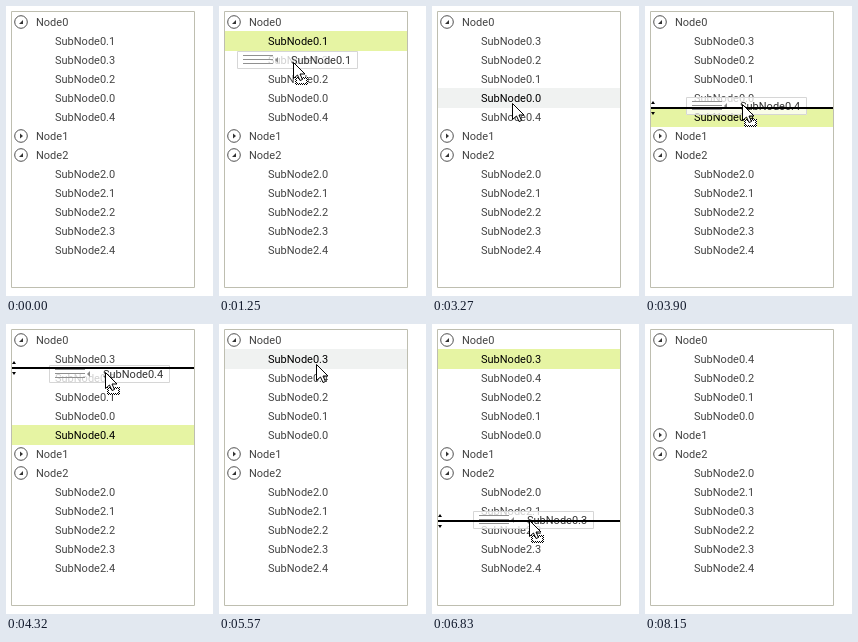
Recreate the animation shown at these times as an HTML page with a canvas. Size 207x290 px, loop 8430 ms.

```html
<!DOCTYPE html>
<html lang="en">
<head>
<meta charset="utf-8">
<title>Tree drag and drop</title>
<style>
  html, body { margin: 0; width: 100%; height: 100%; overflow: hidden; background: #fff; }
  canvas { display: block; }
</style>
</head>
<body>
<canvas id="stage" width="207" height="290"></canvas>
<script>
const ctx = document.getElementById('stage').getContext('2d', { alpha: false });
const LOOP = 8430, STEP = 140, SETTLE = 150;
const TOP = 6, ROW = 19, LEFT = 6, RIGHT = 188;

const children = (node, order) => order.map(n => `SubNode${node}.${n}`);
const START = ['Node0', ...children(0, [1, 3, 2, 0, 4]), 'Node1',
  'Node2', ...children(2, [0, 1, 2, 3, 4])];

const DRAGS = [
  { press: 970, lift: 1100, drop: 2680, from: 1, to: 3 },
  { press: 3650, lift: 3780, drop: 4920, from: 5, to: 2 },
  { press: 5720, lift: 5850, drop: 7290, from: 1, to: 9 },
];

// The pointer glides to each point in even steps, resting in between
const ENTRY = { x: 220, y: 83 }, ENTER = 150, LEAVE = 8150;
const GLIDES = [
  { start: 150, end: 660, x: 75, y: 40 },
  { start: 970, end: 1940, x: 75, y: 83 },
  { start: 3270, end: 3270, x: 81, y: 97 },
  { start: 3390, end: 3520, x: 97, y: 110 },
  { start: 3780, end: 4320, x: 100, y: 48 },
  { start: 4470, end: 4470, x: 100, y: 45 },
  { start: 5570, end: 5570, x: 98, y: 40 },
  { start: 5850, end: 6560, x: 98, y: 182 },
  { start: 6680, end: 6680, x: 98, y: 196 },
  { start: 7850, end: 8000, x: 160, y: 272 },
];

function pointerAt(t) {
  let pos = ENTRY;
  for (const { start, end, x, y } of GLIDES) {
    if (t < start) break;
    const gaps = Math.round((end - start) / STEP);
    const done = gaps ? Math.min(gaps, Math.floor((t - start) * gaps / (end - start))) : 0;
    const p = (done + 1) / (gaps + 1);
    pos = { x: Math.round(pos.x + (x - pos.x) * p), y: Math.round(pos.y + (y - pos.y) * p) };
  }
  return pos;
}

function polygon(points, fill, stroke) {
  ctx.beginPath();
  points.forEach(([x, y]) => ctx.lineTo(x, y));
  ctx.closePath();
  ctx.fillStyle = fill;
  ctx.fill();
  if (stroke) outline(stroke);
}

function outline(color) {
  ctx.strokeStyle = color;
  ctx.lineWidth = 1;
  ctx.stroke();
}

function frame(x, y, w, h, color) {
  ctx.beginPath();
  ctx.rect(x + 0.5, y + 0.5, w - 1, h - 1);
  outline(color);
}

function label(text, x, y, color) {
  ctx.font = '11px Roboto, "Open Sans", sans-serif';
  ctx.fillStyle = color;
  ctx.fillText(text, x, y);
}

function expander(cy, open) {
  ctx.beginPath();
  ctx.arc(15, cy, 6.3, 0, Math.PI * 2);
  outline('#505050');
  polygon(open
    ? [[17, cy - 2], [17, cy + 2], [13, cy + 2]]
    : [[14, cy - 2.5], [17, cy], [14, cy + 2.5]], '#333');
}

function drawTree(rows, selected, hovered) {
  rows.forEach((name, i) => {
    const y = TOP + i * ROW, cy = y + 10;
    const active = i === selected || i === hovered;
    if (active) {
      ctx.fillStyle = i === selected ? '#e6f4a3' : '#f0f2f1';
      ctx.fillRect(LEFT, y, RIGHT - LEFT, ROW + 1);
    }
    const child = name.startsWith('Sub');
    if (!child) expander(cy, name !== 'Node1');
    label(name, child ? 49 : 30, cy + 4, active ? '#000' : '#444');
  });
  frame(5, 5, 184, 277, '#bebeb0');
}

function drawHint(text, x, y) {
  ctx.fillStyle = 'rgba(255,255,255,0.75)';
  ctx.fillRect(x, y, 121, 18);
  frame(x, y, 121, 18, '#d6d6d6');
  ctx.fillStyle = '#909090';
  for (let dy = 4; dy <= 12; dy += 4) ctx.fillRect(x + 6, y + dy, 30, 1);
  polygon([[x + 38, y + 9], [x + 41, y + 6], [x + 41, y + 12]], '#888');
  label(text, x + 54, y + 13, '#333');
}

function drawDropLine(y) {
  ctx.fillStyle = '#000';
  ctx.fillRect(LEFT, y - 1, RIGHT - LEFT, 2);
  for (const s of [-1, 1]) {
    polygon([[6, y + 4 * s], [10, y + 4 * s], [8, y + 7 * s]], '#000');
  }
}

// Checkered two-pixel outline below the arrow
function drawDragBox(x, y, w, h) {
  ctx.fillStyle = '#fff';
  ctx.fillRect(x, y, w, h);
  ctx.fillStyle = '#000';
  for (let i = 0; i < w; i++) {
    for (let j = 0; j < h; j++) {
      const border = Math.min(i, j, w - 1 - i, h - 1 - j) < 2;
      if (border && (i + j) % 2 === 0) ctx.fillRect(x + i, y + j, 1, 1);
    }
  }
}

function drawPointer(x, y, dragging) {
  if (dragging) drawDragBox(x + 1, y + 15, 13, 8);
  const arrow = [[0, 0], [0, 16], [4, 12.5], [6.5, 18], [9, 17], [6.5, 11.5], [11.5, 11.5]];
  polygon(arrow.map(([dx, dy]) => [x + dx - 0.5, y + dy + 0.5]), '#fff', '#000');
}

function render(t) {
  ctx.fillStyle = '#fff';
  ctx.fillRect(0, 0, 207, 290);

  const rows = START.slice();
  for (const d of DRAGS) {
    if (t >= d.drop) rows.splice(d.to, 0, ...rows.splice(d.from, 1));
  }
  const drag = DRAGS.find(d => t >= d.press && t < d.drop);
  const visible = t >= ENTER && t < LEAVE;
  const { x, y } = pointerAt(t);
  const hovering = visible && !drag && x < RIGHT;
  drawTree(rows, drag ? drag.from : -1, hovering ? Math.floor((y - TOP - 1) / ROW) : -1);
  if (!visible) return;

  const lifted = Boolean(drag) && t >= drag.lift;
  if (lifted) {
    // The hint trails the pointer until it rests
    const lag = 2 * Math.sign(y - pointerAt(t - SETTLE).y);
    drawHint(rows[drag.from], x - 57, y - 9 - lag);
    const edge = TOP + Math.round((y - TOP) / ROW) * ROW;
    if (Math.abs(y - edge) <= 5) drawDropLine(y > edge ? edge : edge + 1);
  }
  drawPointer(x, y, lifted);
}

const began = performance.now();
function tick() {
  render((performance.now() - began) % LOOP);
  requestAnimationFrame(tick);
}
tick();
</script>
</body>
</html>
```
